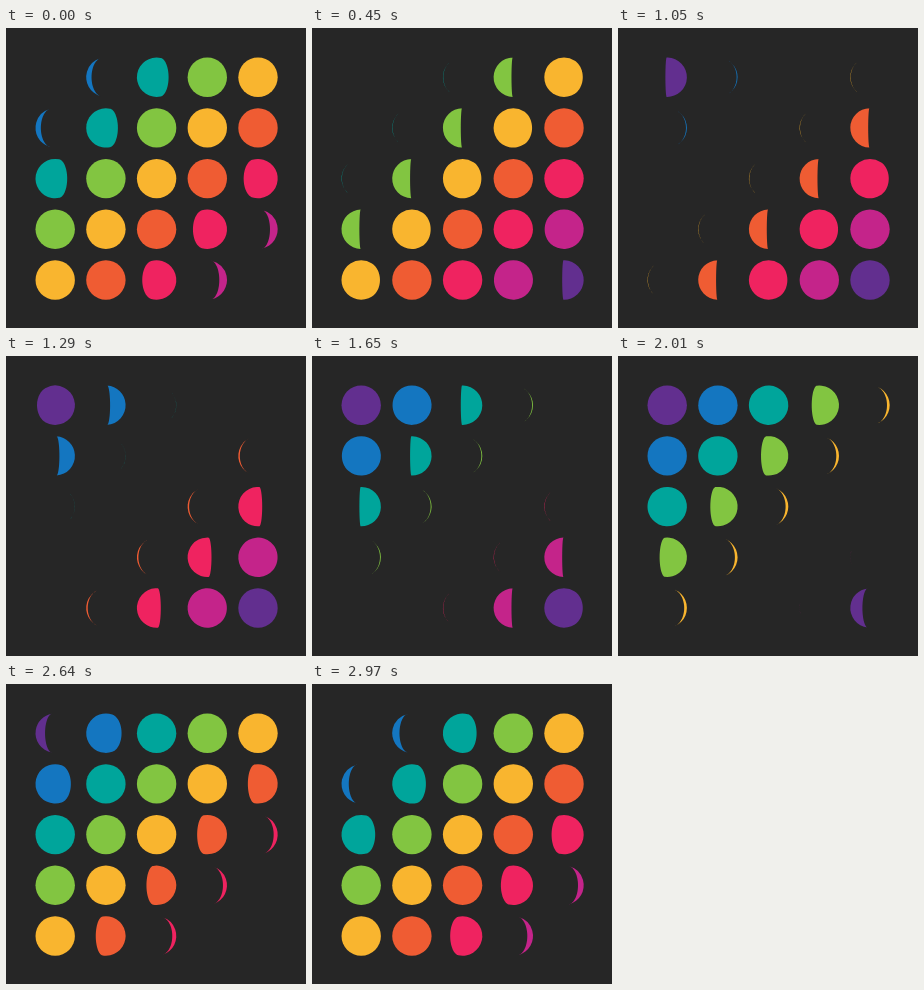
Write an HTML page with a canvas that moves like this. It is 300 px wide and 300 px high and loops after 3 s.

```html
<!DOCTYPE html>
<html lang="en">
<head>
<meta charset="utf-8">
<title>Moon phases</title>
<style>
  html, body { margin: 0; width: 100%; height: 100%; overflow: hidden; background: #262626; }
  canvas { display: block; width: 300px; height: 300px; }
</style>
</head>
<body>
<canvas></canvas>
<script>
const LOOP = 3000, STEP = 30, DELAY = 300, HALF_LIT = 1032;
const GAP = 50.7, FIRST = 49.2, R = 19.7;
const CAMERA = 2.4; // viewing distance in sphere radii
const K = Math.sqrt(CAMERA * CAMERA - 1);
const COLORS = ['#622f8f', '#1476c0', '#00a59b', '#82c541', '#f9b52f',
                '#ef5c33', '#ef2360', '#c4248a', '#622f8f'];

const canvas = document.querySelector('canvas');
const ctx = canvas.getContext('2d');
const ratio = window.devicePixelRatio || 1;
canvas.width = canvas.height = 300 * ratio;

// Outline of the lit part of a sphere seen in perspective
function moon(cx, cy, phase) {
  const waning = Math.cos(phase) < 0;
  const angle = Math.PI / 2 * Math.sin(phase) * (waning ? -1 : 1);
  const sin = Math.sin(angle), cos = Math.cos(angle);

  ctx.beginPath();
  if (CAMERA * cos <= 1) {
    if (waning === angle > 0) return;
    ctx.arc(cx, cy, R, 0, 2 * Math.PI);
  } else {
    const reach = Math.acos(1 / (CAMERA * cos));
    for (let i = -24; i <= 24; i++) {
      const a = reach * i / 24;
      const scale = K * R / (CAMERA - Math.cos(a) * cos);
      ctx.lineTo(cx - scale * Math.cos(a) * sin, cy + scale * Math.sin(a));
    }
    const tip = Math.acos(-sin / cos / K);
    ctx.arc(cx, cy, R, tip, -tip, !waning);
  }
  ctx.fill();
}

function draw(time) {
  ctx.setTransform(ratio, 0, 0, ratio, 0, 0);
  ctx.fillStyle = '#262626';
  ctx.fillRect(0, 0, 300, 300);
  for (let row = 0; row < 5; row++) {
    for (let col = 0; col < 5; col++) {
      const d = row + col;
      ctx.fillStyle = COLORS[d];
      moon(FIRST + col * GAP, FIRST + row * GAP,
           2 * Math.PI * (time - d * DELAY - HALF_LIT) / LOOP);
    }
  }
}

let start;
function tick(now) {
  start ??= now;
  draw(Math.floor((now - start) % LOOP / STEP) * STEP);
  requestAnimationFrame(tick);
}
requestAnimationFrame(tick);
</script>
</body>
</html>
```
